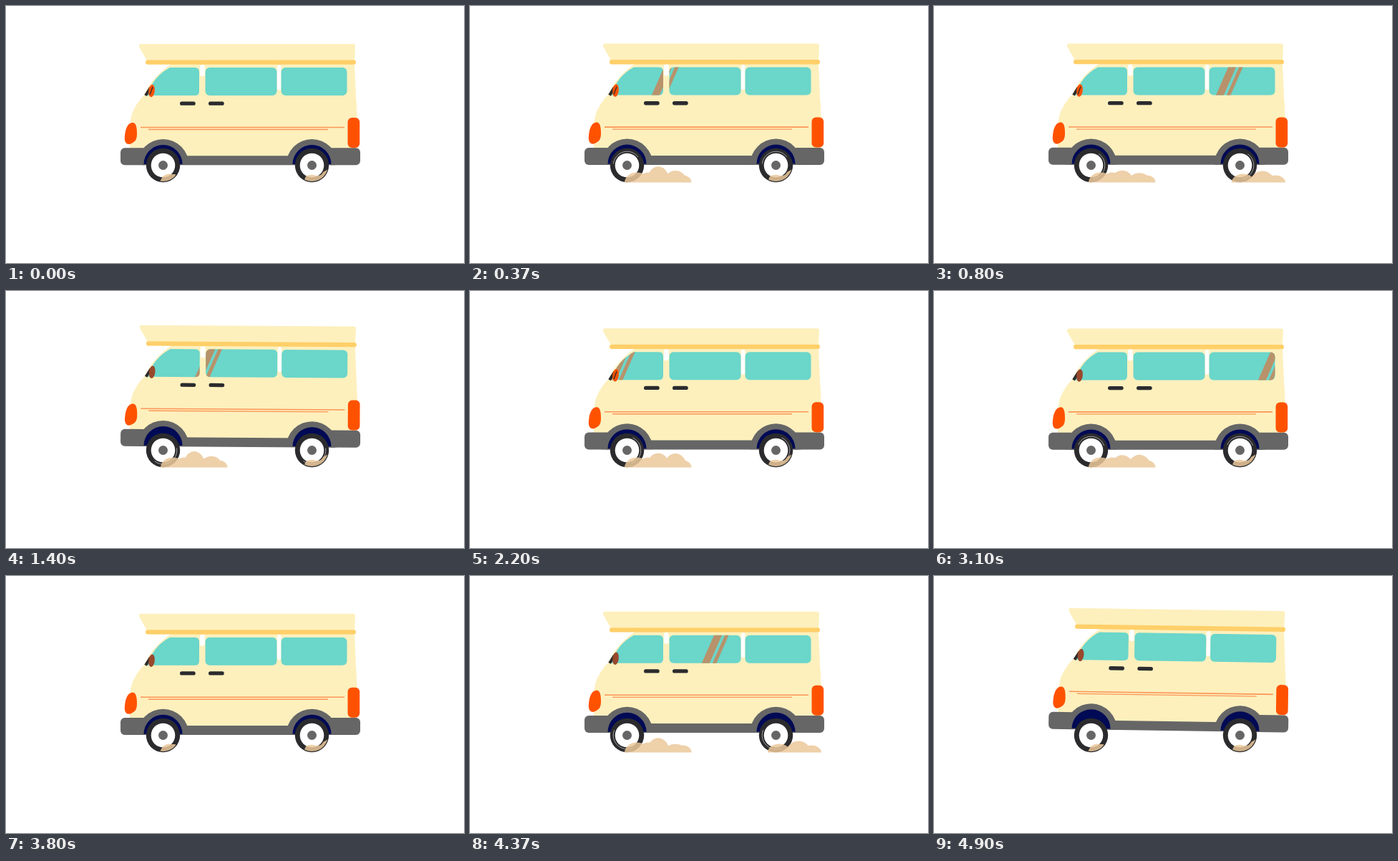
Animation of 640 by 359 pixels, one loop 5000 ms. Source, as an HTML page with a canvas:

```html
<!DOCTYPE html>
<html>
<head>
<meta charset="utf-8">
<style>
html, body { margin: 0; width: 100%; height: 100%; overflow: hidden; background: #fff; }
canvas { display: block; }
</style>
</head>
<body>
<canvas id="stage" width="640" height="359"></canvas>
<script>
const ctx = document.getElementById('stage').getContext('2d');
const LOOP = 5000, STEP = 200 / 3, RIDE = 3767, SWEEP = 1035;
const BASE = 246.6, WHEEL_Y = 222.5, FRONT = 219.5, REAR = 427.5;
const CREAM = '#fdf0bd', TEAL = '#6bd6ca', ORANGE = '#ff5200', GREY = '#666', DARK = '#2b2b2e';
const DUST = 'rgba(236,200,155,.85)';

function fill(color, path) {
  ctx.fillStyle = color;
  ctx.fill(path);
}

function box(x, y, w, h, r) {
  const p = new Path2D();
  p.roundRect(x, y, w, h, r);
  return p;
}

function disc(x, y, r) {
  const p = new Path2D();
  p.arc(x, y, r, 0, Math.PI * 2);
  return p;
}

function line(color, width, x1, y1, x2, y2) {
  ctx.strokeStyle = color;
  ctx.lineWidth = width;
  ctx.beginPath();
  ctx.moveTo(x1, y1);
  ctx.lineTo(x2, y2);
  ctx.stroke();
}

// Linear interpolation through [time, value] points
function track(points, t) {
  for (let i = 1; i < points.length; i++) {
    const [t0, v0] = points[i - 1], [t1, v1] = points[i];
    if (t <= t1) return v0 + (v1 - v0) * Math.max(0, (t - t0) / (t1 - t0));
  }
  return points[points.length - 1][1];
}

const roof = new Path2D('M189 53H485Q488 53 488 56L487 78H198L186 57Q185 53 189 53Z');
const shell = new Path2D('M231 81H487L489 125L491 160L490 212H173V170Q174 151 180 142Q186 131 193 124.5Q205 98 231 81Z');
const headlight = new Path2D('M176 163C182 162 183 170 183 178C183 188 180 190 173 193C167 194 165 188 166 181C167 171 170 164 176 163Z');
const windows = new Path2D('M229 86H264Q270 86 270 92V119Q270 125 264 125H197Q206 98 229 86Z');
windows.addPath(box(278.5, 86, 100, 39, 6));
windows.addPath(box(384.5, 86, 92, 39, 6));

function drawGlint(ride) {
  const sweep = Math.floor((ride - 60) / SWEEP);
  if (sweep < 0 || sweep > 2) return;
  ctx.save();
  ctx.clip(windows);
  ctx.translate(0.3 * (ride - 125 - sweep * SWEEP) - 206, 0);
  ctx.fillStyle = '#b8926b';
  for (const [left, width] of [[397, 11], [412, 5.5]]) {
    ctx.beginPath();
    ctx.moveTo(left, 126);
    ctx.lineTo(left + 18, 85);
    ctx.lineTo(left + 18 + width, 85);
    ctx.lineTo(left + width, 126);
    ctx.fill();
  }
  ctx.restore();
}

function drawMirror(time) {
  const bright = time < 1100 || (time > 1950 && time < 2600);
  line(DARK, 4, 195, 125, 202, 114);
  ctx.fillStyle = bright ? ORANGE : '#98482c';
  ctx.beginPath();
  ctx.ellipse(203.5, 118.5, 4.3, 8.8, 0.12, 0, Math.PI * 2);
  ctx.fill();
  if (bright) line(DARK, 1.3, 201, 124, 205, 113);
}

function drawBody(time, ride) {
  const bob = 3.2 * Math.sin(Math.PI * ride / (RIDE / 10)) ** 2;
  const hump = track([[820, 0], [1100, 1], [1400, 0.42], [1700, 0.38], [1900, 0]], ride);
  ctx.save();
  ctx.translate(480, 222 - bob - 3.8 * hump);
  ctx.rotate(0.0145 * hump);
  ctx.translate(-480, -222);

  fill(CREAM, shell);
  fill(CREAM, roof);
  fill('#ffcf69', box(195, 75.5, 294, 6.3, 3));
  fill('#fff', box(270.8, 82, 7, 16, 3));
  fill('#fff', box(378.8, 82.5, 5.6, 35, 3));
  fill(TEAL, windows);
  drawGlint(ride);
  drawMirror(time);
  for (const x of [243, 283]) fill(DARK, box(x, 133.5, 21.7, 5.3, 2.6));
  line('#fb9557', 1.6, 188, 169.5, 473, 169.5);
  line('#fb9557', 1.3, 199, 172.5, 450, 172.5);

  fill(GREY, box(160, 198.3, 40, 24, 6));
  fill(GREY, box(448, 198.3, 47, 24, 6));
  fill(GREY, box(190, 209.3, 270, 13, 0));
  for (const x of [FRONT, REAR]) {
    const arch = new Path2D(), well = new Path2D();
    arch.arc(x, 222, 36, Math.PI, 0);
    well.arc(x, 221, 27, Math.PI, 0);
    fill(GREY, arch);
    fill('#000a55', well);
  }
  fill(ORANGE, headlight);
  fill(ORANGE, box(477.5, 156, 16.7, 42, 6));
  ctx.restore();
}

function drawWheel(x, ride, rolling) {
  fill(DARK, disc(x, WHEEL_Y, 23.7));
  fill('#fff', disc(x, WHEEL_Y, 16.8));
  fill(GREY, disc(x, WHEEL_Y, 6.5));
  if (!rolling) return;
  const turn = -ride / 110;
  ctx.strokeStyle = 'rgba(255,255,255,.6)';
  ctx.lineWidth = 0.9;
  ctx.beginPath();
  ctx.arc(x, WHEEL_Y, 19.3, turn, turn + 2.4);
  ctx.stroke();
}

// Humps are [x, half width, height], all sitting on the ground
function drawDust(humps) {
  const p = new Path2D();
  for (const [x, w, h] of humps) {
    p.moveTo(x + w, BASE);
    p.ellipse(x, BASE, w, h, 0, 0, Math.PI, true);
    p.closePath();
  }
  fill(DUST, p);
}

function drawTyreDust(x, shape) {
  ctx.save();
  ctx.clip(disc(x, WHEEL_Y, 22.5));
  fill(DUST, shape);
  ctx.restore();
}

const frontSpot = new Path2D('M214 247L219 238Q225 233 231 235L237 235L236 247Z');
const rearSpot = new Path2D('M415 247L419 238Q426 234 433 237Q441 238 443 232L450 228L446 247Z');

function render(time) {
  const ride = time % RIDE;
  const phase = ride % SWEEP;
  const active = ride < 3 * SWEEP + 60;
  const frontOn = active && phase > 105 && phase < 1033;
  const rearOn = active && phase > 480 && phase < 900;
  const wave = peak => Math.cos(2 * Math.PI * (phase - peak) / SWEEP);

  ctx.fillStyle = '#fff';
  ctx.fillRect(0, 0, 640, 359);
  drawBody(time, ride);
  drawWheel(FRONT, ride, frontOn);
  drawWheel(REAR, ride, frontOn);

  if (frontOn) {
    const middle = 19.5 + 3 * wave(360), tail = 15.5 + 4 * wave(120);
    drawDust([[233, 17, 14], [249, 13, 14], [263, 16, middle], [287, 16, tail], [298, 11.5, 10]]);
  } else {
    drawTyreDust(FRONT, frontSpot);
  }
  if (rearOn) drawDust([[432, 16, 12], [459, 17, 16], [477, 14, 10]]);
  else drawTyreDust(REAR, rearSpot);
}

const start = performance.now();
function tick() {
  const elapsed = (performance.now() - start) % LOOP;
  render(Math.floor((elapsed + 4) / STEP) * STEP);
  requestAnimationFrame(tick);
}
tick();
</script>
</body>
</html>
```
